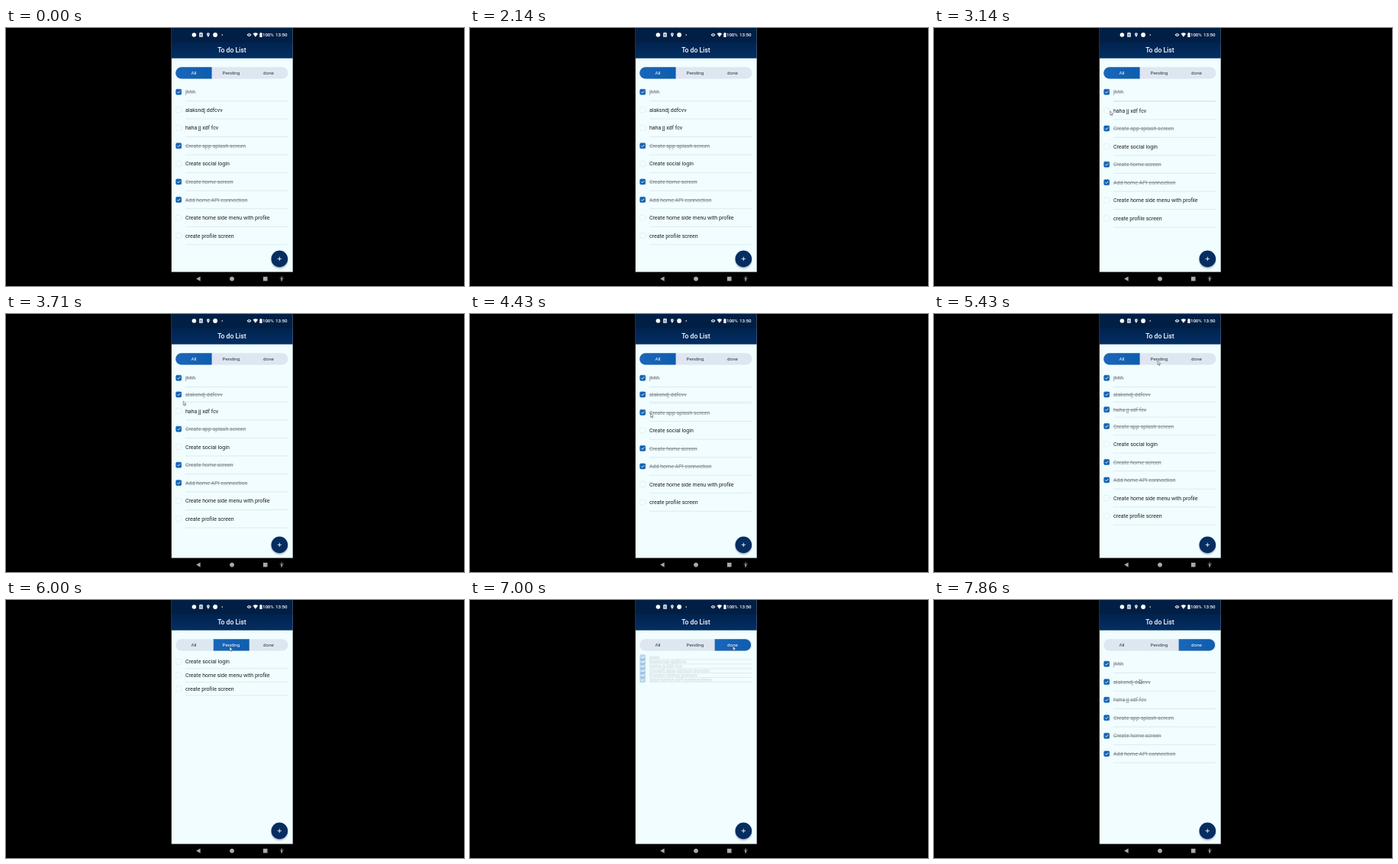
Write an HTML page that moves like this. It is 600 by 338 pixels and loops after 8000 ms.

```html
<!DOCTYPE html>
<html lang="en">
<head>
<meta charset="utf-8">
<title>To do List</title>
<style>
  html, body { margin: 0; width: 100%; height: 100%; overflow: hidden; background: #000; }
  svg { display: block; width: 100vw; height: 100vh; }
  text { font-family: Roboto, sans-serif; }
  .item { font-size: 7.05px; fill: #1b2225; }
  .done .item { fill: #7f878b; text-decoration: line-through; }
  .box { fill: #f4fdff; stroke: #dce7ec; stroke-width: .6; }
  .done .box { fill: #1463b4; stroke: #1463b4; }
  .tick { fill: none; stroke: #fff; stroke-width: .9; visibility: hidden; }
  .done .tick { visibility: inherit; }
  .rule { stroke: #d8e3e8; stroke-width: .7; }
  .tab { font-size: 6.25px; text-anchor: middle; fill: #30383e; }
  .tab.on { fill: #fff; }
  .status { font-size: 6.15px; font-weight: 500; fill: #fff; }
</style>
</head>
<body>
<svg viewBox="0 0 600 338" preserveAspectRatio="none">
  <defs>
    <linearGradient id="bar" x1="0" y1="0" x2="0" y2="1">
      <stop offset="0" stop-color="#00244f"/><stop offset="1" stop-color="#042e62"/>
    </linearGradient>
    <linearGradient id="sel" x1="0" y1="0" x2="1" y2="0">
      <stop offset="0" stop-color="#1a66b9"/><stop offset="1" stop-color="#0f5dae"/>
    </linearGradient>
    <filter id="soft" x="-50%" y="-50%" width="200%" height="200%"><feGaussianBlur stdDeviation="1.3"/></filter>
  </defs>
  <rect width="600" height="338" fill="#000"/>
  <rect x="216.8" width="158.9" height="320" fill="#f1fdff"/>
  <rect x="216.8" width="158.9" height="19" fill="#011f45"/>
  <rect x="216.8" y="18.8" width="158.9" height="20.9" fill="url(#bar)"/>

  <g fill="#fff">
    <circle cx="246.4" cy="9" r="2.8"/>
    <path d="M253.2 6.6h4.6v5.2h-4.6z M254 5.8h1v1h-1z M256 5.8h1v1h-1z"/>
    <path d="M254.1 8.2h2.8M254.1 10h2.8" stroke="#011f45" stroke-width=".7"/>
    <path d="M264.9 6.2a1.9 1.9 0 0 1 1.9 1.9q0 1.2-1.9 3.8q-1.9-2.6-1.9-3.8a1.9 1.9 0 0 1 1.9-1.9z"/>
    <circle cx="264.9" cy="8.1" r=".7" fill="#011f45"/>
    <circle cx="274.1" cy="9" r="2.9"/>
    <circle cx="283.3" cy="9" r=".8"/>
    <path d="M315.6 9q2.9-4 5.8 0q-2.9 4-5.8 0z"/>
    <circle cx="318.5" cy="9" r="1.2" fill="#011f45"/>
    <circle cx="318.5" cy="9" r=".55"/>
    <path d="M323.5 7.5q3.3-2.4 6.6 0l-3.3 4.3z"/>
    <path d="M332.3 6.7h.9v-.8h1.4v.8h.9v5.4h-3.2z"/>
  </g>
  <text class="status" x="335.9" y="11.3">100%</text>
  <text class="status" x="353" y="11.3">13:50</text>
  <text x="295.9" y="31.8" text-anchor="middle" font-size="8.6" font-weight="500" fill="#fff">To do List</text>

  <rect x="222.2" y="51.2" width="147.3" height="15.4" rx="7.6" fill="#dee6f0"/>
  <path id="pill" fill="url(#sel)"/>
  <g id="tabs"></g>
  <g id="rows"></g>

  <circle cx="358.3" cy="304" r="10.6" fill="#00142e" opacity=".38" filter="url(#soft)"/>
  <circle cx="358.3" cy="302.4" r="10.8" fill="#062d60"/>
  <path d="M355.7 302.4h5.2M358.3 299.8v5.2" stroke="#fff" stroke-width=".85"/>

  <rect x="216.8" y="319.6" width="158.9" height="18.4" fill="#000"/>
  <g fill="#a9a9a9">
    <path d="M249.2 328.6l5.4-3.1v6.2z"/>
    <circle cx="296" cy="328.6" r="2.9"/>
    <rect x="336.9" y="325.8" width="5.6" height="5.6"/>
    <circle cx="361.2" cy="326" r=".8"/>
    <path d="M358.7 327.2q2.5.6 5 0v.8l-1.5.3v3.5h-.7v-1.7h-.6v1.7h-.7v-3.5l-1.5-.3z"/>
  </g>
  <path id="cursor" d="M0 0v5.3l1.2-1.1.9 2 .9-.4-.9-1.9h1.7z" fill="#f8f8f8" stroke="#52585c" stroke-width=".6"/>
</svg>
<script>
const NS = "http://www.w3.org/2000/svg";
const LOOP = 8000, FPS = 7, TOP = 72, ROW = 23.53, SMALL = 19.8;
const $ = id => document.getElementById(id);

function add(parent, tag, attrs, text) {
  const el = document.createElementNS(NS, tag);
  for (const k in attrs) el.setAttribute(k, attrs[k]);
  if (text) el.textContent = text;
  return parent.appendChild(el);
}

// Linear interpolation through [time, value] points
function track(t, pts) {
  if (t <= pts[0][0]) return pts[0][1];
  for (let i = 1; i < pts.length; i++) {
    const [t0, v0] = pts[i - 1], [t1, v1] = pts[i];
    if (t < t1) return v0 + (v1 - v0) * (t - t0) / (t1 - t0);
  }
  return pts[pts.length - 1][1];
}

const names = ["jhhh", "alaksndj ddfcvv", "haha jj xdf fcv", "Create app splash screen",
  "Create social login", "Create home screen", "Add home API connection",
  "Create home side menu with profile", "create profile screen"];
const checked = [0, 3, 5, 6];
const toggled = { 1: 2857, 2: 4143 };
const PENDING = 5571, DONE = 6857, GROW = 571;

const rows = names.map(name => {
  const g = add($("rows"), "g", {});
  const body = add(g, "g", {});
  add(body, "rect", { class: "box", x: 222.7, y: -3.5, width: 7, height: 7, rx: 1.3 });
  add(body, "path", { class: "tick", d: "M224.4 .1l1.3 1.3 2.5-2.7" });
  add(body, "text", { class: "item", x: 234.9, y: 2.6 }, name);
  const rule = add(g, "path", { class: "rule", d: "M235 0H369" });
  return { g, body, rule };
});

const tabs = [["All", 246], ["Pending", 294.9], ["done", 344]].map(
  ([name, x]) => add($("tabs"), "text", { class: "tab", x, y: 61.1 }, name));
const pills = [
  "M269.6 51.2V66.6H229.9a7.7 7.7 0 0 1 0-15.4z",
  "M271.8 51.2H318.7V66.6H271.8z",
  "M320.6 51.2H360.4a7.7 7.7 0 0 1 0 15.4H320.6z"
];

const path = [
  [2857, 230.8, 108.8], [3571, 230.8, 108.8], [4143, 236.6, 130], [4714, 236.6, 130],
  [5429, 293, 61.3], [6143, 293, 61.3], [6571, 344.5, 60.5], [7000, 344.5, 60.5],
  [7857, 269.2, 103.8]
];

// Unticked row folds away, then unfolds ticked
function height(i, t) {
  const s = toggled[i];
  if (!s) return ROW;
  return track(t, [[s, ROW], [s + 143, 11], [s + 286, i == 1 ? .8 : 1.8],
    [s + 429, 0], [s + 571, 5], [s + 857, SMALL]]);
}

function draw(t) {
  const tab = t < PENDING ? 0 : t < DONE ? 1 : 2;
  const start = tab == 1 ? PENDING : DONE;
  const grown = track(t, [[start, 0], [start + GROW, ROW]]);
  $("pill").setAttribute("d", pills[tab]);
  tabs.forEach((el, i) => el.setAttribute("class", i == tab ? "tab on" : "tab"));

  let y = TOP;
  rows.forEach((r, i) => {
    const done = checked.includes(i) || t >= toggled[i] + 400;
    const show = tab == 0 || done == (tab == 2);
    const h = !show ? 0 : tab ? grown : height(i, t);
    r.g.setAttribute("class", done ? "done" : "");
    r.g.setAttribute("visibility", h > 0 ? "visible" : "hidden");
    r.body.setAttribute("transform", `translate(0 ${y + h / 2})`);
    r.body.setAttribute("opacity", Math.max(0, Math.min(1, (h - 3) / 12)));
    y += h;
    r.rule.setAttribute("transform", `translate(0 ${y})`);
  });

  const x = track(t, path.map(p => [p[0], p[1]]));
  const cy = track(t, path.map(p => [p[0], p[2]]));
  $("cursor").setAttribute("transform", `translate(${x} ${cy})`);
  $("cursor").setAttribute("visibility", t >= 2857 ? "visible" : "hidden");
}

const begin = performance.now();
function tick() {
  const t = (performance.now() - begin) % LOOP;
  const step = Math.floor((t + 5) * FPS / 1000);
  draw(step * 1000 / FPS % LOOP + .5);
  requestAnimationFrame(tick);
}
tick();
</script>
</body>
</html>
```
